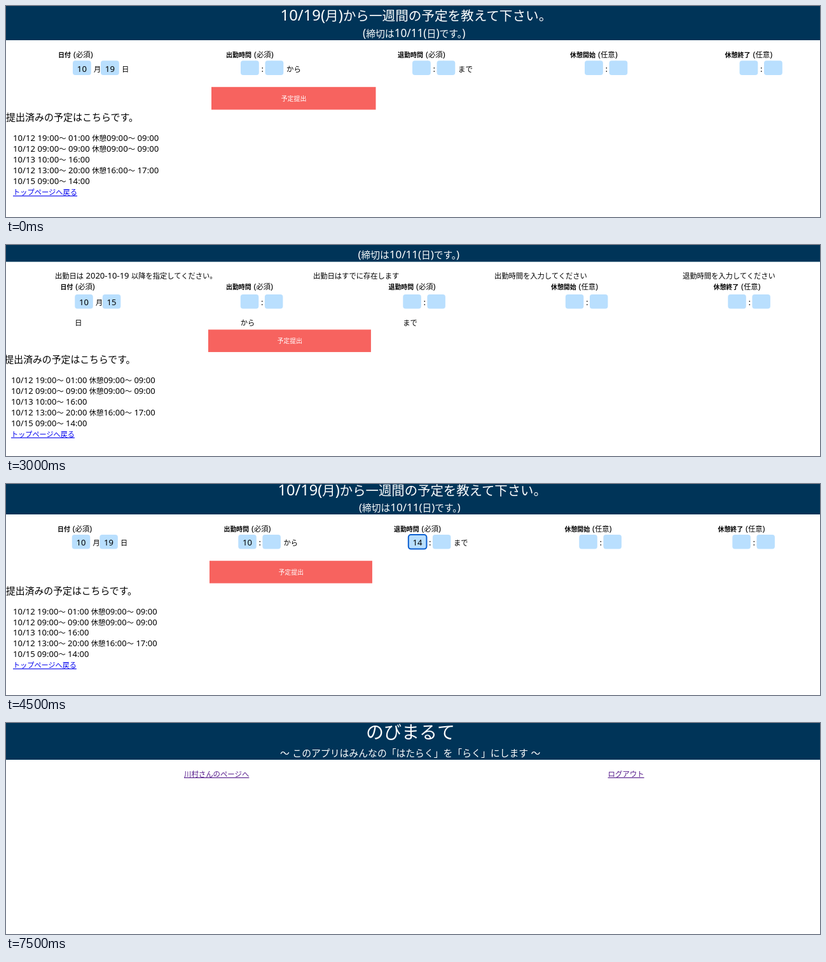
These frames come from a looping animation (1280 px wide and 333 px high, 8 s). An HTML page:

```html
<!DOCTYPE html>
<html lang="ja">
<head>
<meta charset="utf-8">
<title>予定提出</title>
<style>
  html, body { margin: 0; width: 100%; height: 100%; overflow: hidden; background: #fff; }
  svg { display: block; width: 100%; height: 100%; }
  text { font-family: "Noto Sans CJK JP", "Noto Sans CJK", sans-serif; white-space: pre; }
  .latin { font-family: "Noto Sans", sans-serif; }
  .menu { font-family: Inter, sans-serif; font-weight: 500; }
  .link { text-decoration: underline; }
  .popup { filter: drop-shadow(0 4px 5px rgba(0, 0, 0, .35)); }
</style>
</head>
<body>
<svg id="stage" viewBox="0 0 1280 333" preserveAspectRatio="none">
  <defs>
    <linearGradient id="glass" x1="0" y1="0" x2="0" y2="1">
      <stop offset="0" stop-color="#c6d9e5"/>
      <stop offset="1" stop-color="#e2e9ee"/>
    </linearGradient>
  </defs>
</svg>
<script>
const NAVY = '#003458', RED = '#f7635f', SKY = '#b9dffe', BLUE = '#0000ee', PURPLE = '#551a8b';
const LATIN_RATIO = 1.157;
const HOLD = 1500, LOOP = 8000;

const rect = (x, y, w, h, fill, extra = '') =>
  `<rect x="${x}" y="${y}" width="${w}" height="${h}" fill="${fill}" ${extra}/>`;

// y is the middle of the line; Latin runs use a larger size than kana and kanji.
function text(x, y, size, str, fill = '#000', extra = '') {
  const runs = str.replace(/[ -~]+/g, run =>
    `<tspan class="latin" font-size="${(size * LATIN_RATIO).toFixed(2)}">${run}</tspan>`);
  return `<text x="${x}" y="${(y + size * 0.38).toFixed(2)}" font-size="${size}" fill="${fill}" ${extra}>${runs}</text>`;
}
const centred = (x, y, size, str, fill) => text(x, y, size, str, fill, 'text-anchor="middle"');
const link = (x, y, size, str, fill) => text(x, y, size, str, fill, 'class="link"');

const LABELS = ['日付', '出勤時間', '退勤時間', '休憩開始', '休憩終了'];
const SUFFIXES = ['日', 'から', 'まで', '', ''];
const ROWS = [
  '10/12 19:00〜 01:00 休憩09:00〜 09:00',
  '10/12 09:00〜 09:00 休憩09:00〜 09:00',
  '10/13 10:00〜 16:00',
  '10/12 13:00〜 20:00 休憩16:00〜 17:00',
  '10/15 09:00〜 14:00'
];

function header(s) {
  const k = s.k;
  let out = rect(0, 0, 1280, s.header, NAVY);
  if (s.title) out += text(...s.title, 20.6 * k, '10/19(月)から一週間の予定を教えて下さい。', '#fff');
  return out + text(...s.due, 14.85 * k, '(締切は10/11(日)です。)', '#fff');
}

function box(x, y, value, k) {
  return rect(x, y - 13, 28.8 * k, 22.8 * k, SKY, 'rx="4"') +
    (value ? centred(x + 14.4 * k, y, 11.4 * k, value) : '');
}

function field(s, i) {
  const { k, labelY, boxY } = s;
  const x = s.cols[i], left = x + 23 * k;
  const [a, b] = s.values[i] || [];
  const body = 11.4 * k;
  const second = x + (i ? 61.5 : 67) * k;
  let out = text(x, labelY, 10 * k, LABELS[i], '#000', 'font-weight="700"') +
    text(x + (LABELS[i].length * 10 + 4) * k, labelY, body, i < 3 ? '(必須)' : '(任意)') +
    box(left, boxY, a, k) + box(second, boxY, b, k) +
    text(x + (i ? 55.5 : 56) * k, boxY, body, i ? ':' : '月');
  if (SUFFIXES[i]) {
    const wrapped = s.wrap && s.wrap.includes(i);
    out += text(wrapped ? left : x + (i ? 95 : 100) * k, wrapped ? s.wrapY : boxY, body, SUFFIXES[i]);
  }
  return out;
}

function booking(x, y, k, str) {
  const first = x + 123, second = x + 168;
  const tag = (left, name) => rect(left, y - 6, 42.5, 12, RED) + text(left + .5, y, 10.35, name, '#fff');
  return text(x, y, 11.4 * k, str) + tag(first, '変更する') + tag(second, '取り消す');
}

function formPage(s) {
  const k = s.k, body = 11.4 * k;
  const [bx, by] = s.button;
  let out = s.header ? header(s) : '';
  for (const [x, y, msg] of s.errors || []) out += text(x, y, body, msg);
  LABELS.forEach((_, i) => out += field(s, i));
  out += rect(bx, by, 258.5 * k, 35.8 * k, RED) +
    centred(bx + 129.5 * k, by + 18 * k, 10 * k, '予定提出', '#fff');
  out += text(...s.heading, 15 * k, '提出済みの予定はこちらです。');
  const [lx, ly] = s.list;
  ROWS.forEach((row, i) => out += text(lx, ly + i * 17 * k, body, row));
  for (const [y, str] of s.bookings || []) out += booking(lx, y, k, str);
  return out + link(lx, s.linkY, 11.25 * k, 'トップページへ戻る', BLUE) + (s.overlay || '');
}

function minuteMenu() {
  const item = (y, str, fill) =>
    `<text class="menu" x="418" y="${y + 3.8}" font-size="10.5" fill="${fill}">${str}</text>`;
  return rect(408, 32, 29, 22.5, 'none', 'rx="4" stroke="#0b57c4" stroke-width="2"') +
    '<g class="popup">' + rect(399, -10, 52, 63.5, 'url(#glass)', 'rx="4"') + '</g>' +
    rect(399, 36, 52, 13.7, '#2088f4') +
    item(0, '00', '#222') + item(14.2, '15', '#222') + item(28.5, '30', '#222') + item(43, '45', '#fff') +
    '<path d="M405 43.5l2.8 3.3 4.6-7.6" fill="none" stroke="#fff" stroke-width="1.4"/>';
}

function homePage() {
  return rect(0, 0, 1280, 58, NAVY) +
    centred(636, 14, 28, 'のびまるて', '#fff') +
    text(431, 47, 14.85, '〜 このアプリはみんなの「はたらく」を「らく」にします 〜', '#fff') +
    link(280, 80.5, 11.4, '川村さんのページへ', PURPLE) +
    link(946.5, 80.5, 11.4, 'ログアウト', PURPLE);
}

const pages = [
  formPage({
    k: 1, header: 54, title: [431.5, 15], due: [561, 43],
    cols: [82, 346, 616, 887, 1130.5], labelY: 77, boxY: 99.3, values: [['10', '19']],
    button: [323, 127.8], heading: [0, 175], list: [11, 209], linkY: 294
  }),
  formPage({
    k: .99, header: 18, due: [555, 7],
    errors: [[538, 40, '退勤時間は出勤時間より前にしてください']],
    cols: [84, 350.5, 623.5, 870, 1117], labelY: 57.5, boxY: 82.3,
    values: [['10', '20'], ['14', '00'], ['11', '00']], wrap: [2], wrapY: 114,
    button: [320, 124.6], heading: [0, 171.5], list: [11, 205],
    bookings: [[297.5, '10/19 10:00〜 14:00']], linkY: 323
  }),
  formPage({
    k: .99, header: 26.5, due: [553.5, 15.5],
    errors: [
      [77, 49, '出勤日は 2020-10-19 以降を指定してください。'],
      [483, 49, '出勤日はすでに存在します'],
      [768, 49, '出勤時間を入力してください'],
      [1064, 49, '退勤時間を入力してください']
    ],
    cols: [85.5, 346, 601.5, 857, 1112.5], labelY: 66, boxY: 91,
    values: [['10', '15']], wrap: [0, 1, 2], wrapY: 123,
    button: [318, 133.5], heading: [-2.5, 180.5], list: [8, 214], linkY: 298.5
  }),
  formPage({
    k: .99, header: 48, title: [427.5, 10], due: [555, 37],
    cols: [81, 342.5, 610, 878.5, 1119.5], labelY: 71, boxY: 93,
    values: [['10', '19'], ['10'], ['14']],
    button: [320, 121.2], heading: [0, 168], list: [11, 201.5], linkY: 286,
    overlay: rect(632.8, 80, 28.6, 22.6, 'none', 'rx="4" stroke="#0b5fd0" stroke-width="2"')
  }),
  rect(0, 0, 1280, 1, '#bcc6ce') + rect(0, 0, 5, 333, '#e3e8ea') + rect(5, 0, .8, 333, '#bfc4c7') +
  formPage({
    k: .99,
    cols: [86, 347, 614.5, 882.5, 1123.5], labelY: 22.8, boxY: 44.8,
    values: [['10', '22'], ['10', '45'], ['21', '15'], ['15', '30'], ['17', '45']],
    button: [324.7, 72.8], heading: [5, 119.5], list: [16, 153],
    bookings: [[245.5, '10/19 10:00〜 14:00'], [279.5, '10/20 14:00〜 20:00']], linkY: 305,
    overlay: minuteMenu()
  }),
  homePage()
];

const stage = document.getElementById('stage');
stage.insertAdjacentHTML('beforeend', pages.map(p => `<g visibility="hidden">${p}</g>`).join(''));
const groups = [...stage.children].slice(1);

let start = null;
function update(now) {
  if (start === null) start = now;
  const current = Math.floor(((now - start) % LOOP) / HOLD);
  groups.forEach((g, i) => g.setAttribute('visibility', i === current ? 'visible' : 'hidden'));
  requestAnimationFrame(update);
}
update(performance.now());
</script>
</body>
</html>
```
